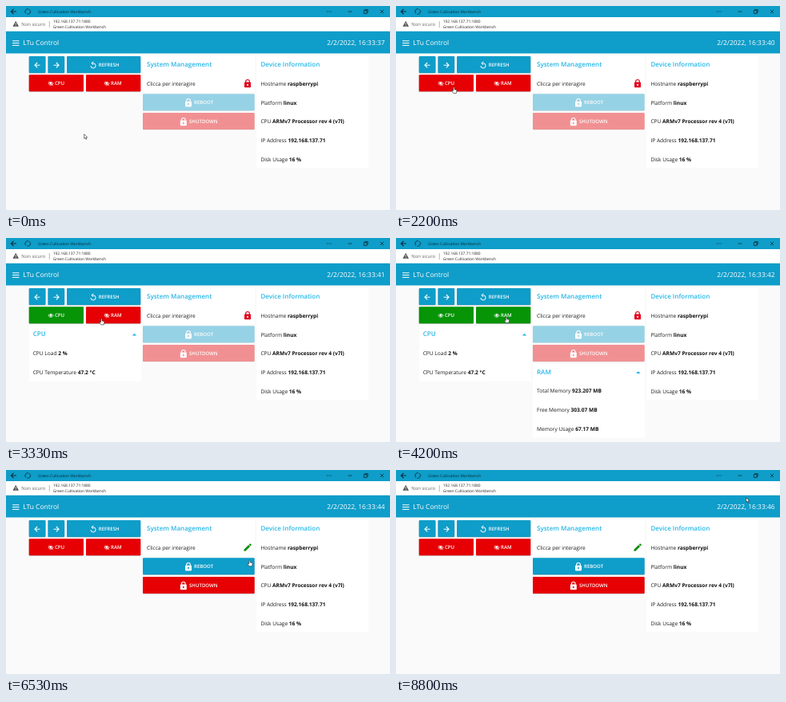
An HTML page for the animation above (8.94 s loop, 480 px wide and 256 px high).

```html
<!DOCTYPE html>
<html lang="it">
<head>
<meta charset="utf-8">
<style>
html, body { margin: 0; width: 100%; height: 100%; overflow: hidden; background: #fafafa; }
svg { display: block; width: 100vw; height: 100vh; }
text { font-family: "Open Sans", "Noto Sans", sans-serif; text-rendering: geometricPrecision; white-space: pre; }
.row { font-size: 6.6px; fill: #1c1c1c; }
.row tspan { font-weight: 700; fill: #111; }
.head { font-size: 8px; font-weight: 600; fill: #27b7e6; }
.label { font-size: 6.1px; font-weight: 600; fill: #fff; }
.line { fill: none; stroke: currentColor; }
</style>
</head>
<body>
<svg id="stage" viewBox="0 0 480 256">
  <defs>
    <path id="lock" fill="currentColor" fill-rule="evenodd" d="M-2.9-1.7V-2.6A2.9 2.7 0 0 1 2.9-2.6V-1.7H3.2Q4-1.7 4-.9V4.2Q4 5 3.2 5H-3.2Q-4 5-4 4.2V-.9Q-4-1.7-3.2-1.7ZM-1.8-1.7H1.8V-2.5A1.8 1.8 0 0 0-1.8-2.5ZM0 .7A1 1 0 1 0 .01 .7Z"/>
    <path id="pen" fill="currentColor" d="M-4.5 2.6L1.2-3.1 3.1-1.2-2.6 4.5H-4.5ZM1.8-3.7L2.8-4.6Q3.2-5 3.6-4.6L4.6-3.6Q5-3.2 4.6-2.8L3.7-1.8Z"/>
    <g id="eye" color="#fff">
      <path class="line" stroke-width=".8" d="M-3.2 0Q0-4 3.2 0Q0 4-3.2 0Z"/>
      <circle r="1.3" fill="#fff"/>
    </g>
    <path id="arrow" class="line" stroke-width="1.1" d="M3.3 0H-3M0-3.2L-3.2 0 0 3.2"/>
    <path id="up" fill="#27b7e6" d="M-2.8 1.4L0-1.4 2.8 1.4Z"/>
  </defs>

  <path fill="#fafafa" d="M0 0H480V256H0Z"/>
  <path fill="#0f9dc9" d="M0 0H480V14H0ZM0 31.5H480V59.5H0Z"/>
  <path fill="#fff" d="M0 14H480V31.5H0Z"/>

  <!-- browser window -->
  <g color="#0b2c38" stroke-width=".8">
    <use href="#arrow" x="9.5" y="7"/>
    <path class="line" d="M24.7 9.4A3.4 3.4 0 0 1 27-3.4M0 0" visibility="hidden"/>
    <circle class="line" cx="27.2" cy="7" r="3.3" stroke-dasharray="8.4 2" transform="rotate(-50 27.2 7)"/>
    <path class="line" stroke-dasharray="1 1.5" stroke-width="1" d="M400.8 7H407"/>
    <path class="line" d="M427.6 7H432.2M447.3 5.7H451V9.4H447.3ZM448.5 5.5V4.5H452.2V8.2H451.2M468 5L472 9M472 5L468 9"/>
  </g>
  <text x="40" y="8.8" font-size="4.85" fill="#0b2c38">Green Cultivation Workbench</text>
  <path fill="#555" fill-rule="evenodd" d="M12.2 18.7L16 25.8H8.4ZM11.8 21.2V23.4H12.6V21.2ZM11.8 24V24.8H12.6V24Z"/>
  <text x="19.3" y="24.8" font-size="5.9" fill="#666">Non sicuro</text>
  <path class="line" color="#888" stroke-width=".6" d="M54.3 19V27"/>
  <text x="58.8" y="21.4" font-size="4.87" fill="#222">192.168.137.71:1880</text>
  <text x="58.8" y="28.4" font-size="4.85" fill="#222">Green Cultivation Workbench</text>

  <!-- page header -->
  <path class="line" color="#fff" stroke-width="1" d="M8 43.8H16.5M8 46.6H16.5M8 49.4H16.5"/>
  <text x="21.3" y="49.2" font-size="8.45" fill="#fff">LTu Control</text>
  <text id="clock" x="473.5" y="49.2" font-size="8.4" fill="#fff" text-anchor="end"></text>

  <path fill="#fff" d="M171 63H311V108H171ZM313.5 63H453V203H313.5Z"/>
  <g id="content"></g>
  <use id="padlock" x="302" y="97.2"/>

  <g id="cursor">
    <path id="pointer" fill="#fff" stroke="#222" stroke-width=".6" d="M0 0V5.6L1.3 4.4 2.3 6.6 3.2 6.2 2.3 4.1H4Z"/>
    <path id="hand" fill="#fff" stroke="#222" stroke-width=".6" d="M-.8 4.9V.7Q0-.4.7.7V3L3 3.5Q3.7 3.8 3.6 4.7L3 7.8H-.5L-2.4 5.2Q-2.4 4.2-1.5 4.4Z"/>
  </g>
</svg>
<script>
const LOOP = 8940, BLUE = '#0f9dc9', RED = '#e60004', GREEN = '#079407';
const el = id => document.getElementById(id);
const content = el('content');

const row = (x, y, name, value = '') =>
  `<text class="row" x="${x}" y="${y + 2.4}">${name} <tspan>${value}</tspan></text>`;
const head = (x, y, s) => `<text class="head" x="${x}" y="${y + 2.9}">${s}</text>`;
const label = (x, y, s) => `<text class="label" x="${x}" y="${y + 2.2}">${s}</text>`;
const icon = (id, x, y) => `<use href="#${id}" x="${x}" y="${y}" color="#fff"/>`;
const box = (x, y, w, id, fill) =>
  `<rect x="${x}" y="${y + .8}" width="${w}" height="21" rx="1" fill="#000" opacity=".22"/>
   <rect id="${id}" x="${x}" y="${y}" width="${w}" height="21" rx="1" fill="${fill}"/>`;
const toggle = (x, w, id, cx) => box(x, 86.3, w, id, RED) + icon('eye', cx, 97.3) +
  `<path id="${id}Slash" class="line" color="#fff" stroke-width=".8" d="M${cx - 2.6} 95l5.2 4.6"/>` +
  label(cx + 5, 97.2, id.toUpperCase());
const panel = (id, x, y, rows) =>
  `<g id="${id}Panel"><rect x="${x}" y="${y - 10}" width="140" height="${22 + rows.length * 23.6}" fill="#fff"/>` +
  head(x + 5, y, id.toUpperCase()) + `<use href="#up" x="${x + 131.8}" y="${y + .6}"/>` +
  rows.map(([n, v], i) => row(x + 5, y + 24 + i * 23.7, n, v)).join('') + '</g>';

content.innerHTML =
  box(28.7, 63, 20.8, 'prev', BLUE) + icon('arrow', 39.2, 74.2) +
  box(52.4, 63, 20.8, 'next', BLUE) +
  '<use href="#arrow" transform="translate(62.8 74.2) scale(-1 1)" color="#fff"/>' +
  box(76, 63, 92.3, 'refresh', BLUE) +
  '<path class="line" color="#fff" stroke-width="1" d="M107.6 71.8H109A3.1 3.1 0 1 1 105.9 75M109.2 69.6L107 71.8 109.2 74"/>' +
  label(115.8, 73.6, 'REFRESH') +
  toggle(28.7, 68.3, 'cpu', 56) + toggle(100, 68.3, 'ram', 126) +
  head(176, 73, 'System Management') + row(176, 97.4, 'Clicca per interagire') +
  '<g id="power">' +
  box(171, 110.2, 139.7, 'reboot', BLUE) + icon('lock', 228, 121.4) + label(235, 121, 'REBOOT') +
  box(171, 134, 139.7, 'shutdown', RED) + icon('lock', 221.8, 145.2) + label(229, 144.8, 'SHUTDOWN') +
  '</g>' +
  head(318.4, 73, 'Device Information') +
  [['Hostname', 'raspberrypi'], ['Platform', 'linux'], ['CPU', 'ARMv7 Processor rev 4 (v7l)'],
   ['IP Address', '192.168.137.71'], ['Disk Usage', '16 %']]
    .map(([n, v], i) => row(318.4, 97.4 + i * 23.7, n, v)).join('') +
  panel('cpu', 28.7, 120.5, [['CPU Load', '2 %'], ['CPU Temperature', '47.2 °C']]) +
  panel('ram', 171, 168, [['Total Memory', '923.207 MB'], ['Free Memory', '303.07 MB'], ['Memory Usage', '67.17 MB']]);

// pointer path: time, x, y
const path = [
  [0, 97.7, 160.8], [1270, 97.7, 160.8], [2130, 72.3, 101.7], [2500, 72.3, 101.7],
  [3200, 119.3, 101], [3350, 119.3, 101], [3650, 138, 98.8], [4400, 138, 98.8],
  [4870, 77, 99], [5180, 77, 99], [5870, 302, 96], [6280, 302, 96], [6500, 304.5, 113],
  [6700, 304.5, 113], [7200, 250, 120], [7800, 245, 143], [8100, 260, 138], [8760, 437.7, 34.7], [LOOP, 437.7, 34.7]
];
const ticks = [200, 1270, 2130, 3130, 4000, 5000, 5870, 6870, 7870];

function pointerAt(t) {
  const i = path.findIndex(p => p[0] > t);
  const [t0, x0, y0] = path[i - 1], [t1, x1, y1] = path[i];
  const k = (t - t0) / (t1 - t0), e = k * k * (3 - 2 * k);
  return [x0 + (x1 - x0) * e, y0 + (y1 - y0) * e];
}

const show = (id, on) => el(id).setAttribute('visibility', on ? 'visible' : 'hidden');

function setToggle(id, on) {
  el(id).setAttribute('fill', on ? GREEN : RED);
  show(id + 'Slash', !on);
  show(id + 'Panel', on);
}

function draw(t) {
  const [x, y] = pointerAt(t);
  const inside = (l, top, r, b) => x > l && x < r && y > top && y < b;
  const unlocked = t >= 6270;
  const hand = inside(28, 63, 168, 107) || inside(297, 91, 307, 103) ||
    unlocked && inside(171, 110, 311, 155);

  setToggle('cpu', t >= 2330 && t < 4930);
  setToggle('ram', t >= 3670 && t < 4330);
  el('power').setAttribute('opacity', unlocked ? 1 : .42);
  const lock = el('padlock');
  lock.setAttribute('href', unlocked ? '#pen' : '#lock');
  lock.setAttribute('color', unlocked ? '#078c07' : '#e0001a');
  el('clock').textContent = '2/2/2022, 16:33:' + (37 + ticks.filter(s => t >= s).length);
  el('cursor').setAttribute('transform', `translate(${x} ${y})`);
  show('hand', hand);
  show('pointer', !hand);
}

const start = performance.now();
(function frame() {
  draw((performance.now() - start) % LOOP);
  requestAnimationFrame(frame);
})();
</script>
</body>
</html>
```
